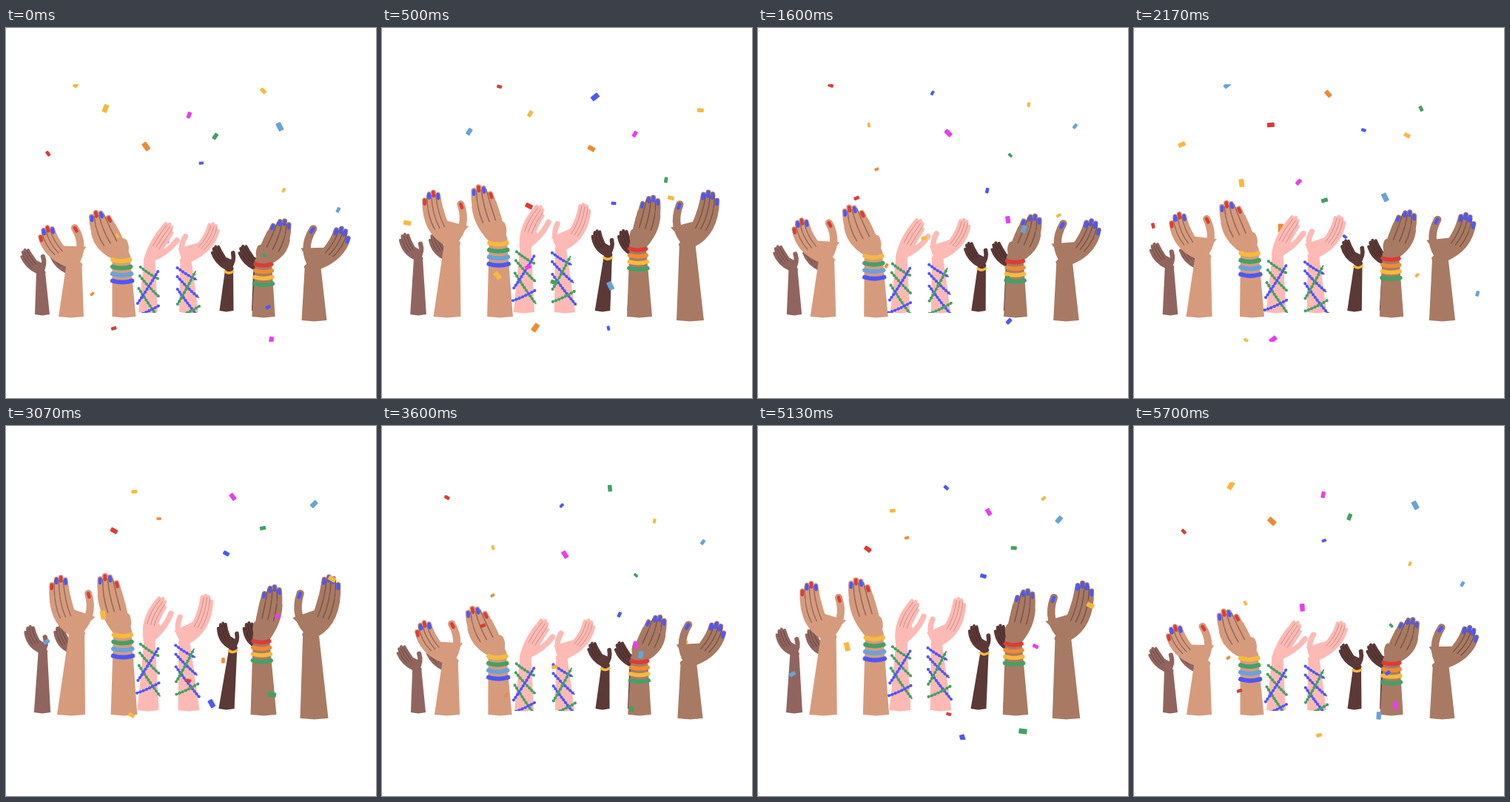
Animation, 500 px wide and 500 px high, one loop 5730 ms. Source, as an HTML page with a canvas:

```html
<!DOCTYPE html>
<html lang="en">
<head>
<meta charset="utf-8">
<title>Raised hands and confetti</title>
<style>
html, body { margin: 0; width: 100%; height: 100%; overflow: hidden; background: #fff; }
canvas { display: block; width: 500px; height: 500px; }
</style>
</head>
<body>
<canvas id="stage" width="500" height="500"></canvas>
<script>
const ctx = document.getElementById('stage').getContext('2d');
const LOOP = 5730, TICK = 100 / 3, STEP = 80, CYCLE = 24;
const TOP = 76, BOTTOM = 424, PIECES = 41, GRAVITY = 2.7;
const RED = '#dc3c36', ORANGE = '#ed8b35', YELLOW = '#f6b93f', GREEN = '#45a065',
      SKY = '#6ba2d8', BLUE = '#4e57f8', PINK = '#ea3df0';

const skins = {
  mauve: { fill: '#91655f', line: '#5f3f3c' },
  peach: { fill: '#d69b7d', line: '#90685a' },
  pink: { fill: '#fdbab4', line: '#c78d83' },
  dark: { fill: '#5b3937', line: '#3f2524' },
  brown: { fill: '#a87a63', line: '#795245' }
};

// Key points are wrist, palm, fingertips and thumb tip, measured from the arm's base.
const shapes = {
  open: {
    low: [[4, -70], [-27, -88], [-34, -116], [5, -120]],
    high: [[8, -114], [-15, -136], [-15, -188], [25, -168]],
    spread: [13.4, 19], wrist: 10.5, tip: 12, pinky: -1, bend: 0.32
  },
  cup: {
    low: [[-4, -81], [-24, -100], [-34, -137], [-1, -100]],
    high: [[-2, -115], [-18, -150], [-21, -188], [3, -135]],
    spread: [25, 22], wrist: 12, tip: 13.5, pinky: 1, bend: 0.33
  },
  reach: {
    low: [[2, -71], [11, -91], [29, -115], [39, -97]],
    high: [[2, -96], [-2, -124], [19, -150], [30, -134]],
    spread: [12, 12], wrist: 7.5, tip: 9, pinky: 1, bend: 0.15
  },
  small: {
    low: [[-2, -57], [-16, -68], [-24, -84], [1, -78]],
    high: [[1, -85], [-14, -96], [-17, -116], [4, -104]],
    spread: [9, 9], wrist: 6, tip: 7.5, pinky: -1, bend: 0.25
  }
};

const defaults = { flip: 1, scale: 1, lean: 0, slim: 1, reach: 1, stub: 1, bands: [], nails: [] };
const rainbow = [RED, ORANGE, YELLOW, GREEN];
const redBlue = [RED, BLUE, RED, BLUE];
const allBlue = Array(4).fill(BLUE);

const arms = [
  { skin: 'mauve', shape: 'small', x: 89, y: 387, base: 9, bands: [RED] },
  { skin: 'mauve', shape: 'small', x: 49, y: 387, base: 10 },
  { skin: 'peach', shape: 'open', x: 88, y: 390, base: 17, nails: redBlue, thumbNail: RED },
  { skin: 'peach', shape: 'cup', x: 159.5, y: 390, base: 16, nails: redBlue, bands: [YELLOW, GREEN, SKY, BLUE] },
  { skin: 'pink', shape: 'reach', x: 192, y: 384, base: 13, beads: [GREEN, BLUE] },
  { skin: 'pink', shape: 'open', x: 247, y: 384, base: 13, flip: -1, slim: 0.72, reach: 0.55, stub: 0.65,
    beads: [BLUE, GREEN] },
  { skin: 'dark', shape: 'small', x: 340, y: 382, base: 8, lean: 0.04 },
  { skin: 'dark', shape: 'small', x: 298, y: 382, base: 9.5, lean: 0.1, slim: 0.9, bands: [YELLOW] },
  { skin: 'brown', shape: 'cup', x: 348, y: 390, base: 17, flip: -1, scale: 0.92, lean: 0.05,
    nails: allBlue, bands: rainbow },
  { skin: 'brown', shape: 'open', x: 416.5, y: 395, base: 16.5, flip: -1, scale: 1.03, lean: -0.03,
    nails: allBlue, thumbNail: BLUE }
].map(arm => ({ ...defaults, ...arm }));

const mix = (a, b, t) => a + (b - a) * t;
const between = (p, q, t) => [mix(p[0], q[0], t), mix(p[1], q[1], t)];
const shift = (p, dir, by) => [p[0] + dir[0] * by, p[1] + dir[1] * by];
const distance = (p, q) => Math.hypot(q[0] - p[0], q[1] - p[1]);

function direction(p, q) {
  const d = distance(p, q) || 1;
  return [(q[0] - p[0]) / d, (q[1] - p[1]) / d];
}

function normal(p, q) {
  const [dx, dy] = direction(p, q);
  return [-dy, dx];
}

// Quadratic curves are [start, control, end]; these cut one at t.
const pointAt = ([a, b, c], t) => between(between(a, b, t), between(b, c, t), t);
const head = (q, t) => [q[0], between(q[0], q[1], t), pointAt(q, t)];
const tail = (q, t) => [pointAt(q, t), between(q[1], q[2], t), q[2]];

function stroke(color, width) {
  ctx.strokeStyle = color;
  ctx.lineWidth = width;
  ctx.lineCap = ctx.lineJoin = 'round';
  ctx.stroke();
}

function drawCurve([a, b, c], color, width) {
  ctx.beginPath();
  ctx.moveTo(...a);
  ctx.quadraticCurveTo(...b, ...c);
  stroke(color, width);
}

function fillBetween(left, right, color) {
  ctx.beginPath();
  ctx.moveTo(...left[0]);
  ctx.quadraticCurveTo(...left[1], ...left[2]);
  ctx.lineTo(...right[2]);
  ctx.quadraticCurveTo(...right[1], ...right[0]);
  ctx.closePath();
  ctx.fillStyle = color;
  ctx.fill();
}

function fillPolygon(points, color) {
  ctx.beginPath();
  points.forEach(p => ctx.lineTo(...p));
  ctx.closePath();
  ctx.fillStyle = color;
  ctx.fill();
}

function drawNail(q, color, width) {
  const back = shift(q[2], direction(q[2], q[1]), 5);
  drawCurve([q[2], between(q[2], back, 0.5), back], color, width);
}

function drawBands(colors, wrist, wristHalf, baseHalf) {
  const thick = wristHalf > 8 ? 6 : 3.5;
  colors.forEach((color, i) => {
    const y = wrist[1] + 5 + 9.5 * i, down = 1 - y / wrist[1];
    const x = wrist[0] * (1 - down), half = mix(wristHalf, baseHalf, down) - 0.5;
    drawCurve([[x - half, y - 1], [x, y + 3], [x + half, y - 1]], color, thick);
  });
}

// Criss-crossing strings: each pair is its drop below the wrist at the left and right edge.
function drawBeads([falling, rising], wrist, flip, lift) {
  const strings = [[falling, 0, 16], [falling, 12, 40], [falling, 29, 70], [rising, 49, 5], [rising, 66, 52]];
  const edge = (side, drop) => {
    const y = wrist[1] + 10 - 6 * lift + drop;
    return [wrist[0] * y / wrist[1] + flip * side * (12 + drop / 20), y];
  };
  ctx.save();
  ctx.beginPath();
  ctx.rect(-40, -200, 80, 201);
  ctx.clip();
  for (const [color, left, right] of strings) {
    const a = edge(-1, left), b = edge(1, right);
    const string = [a, shift(between(a, b, 0.5), [0, 1], 2), b];
    drawCurve(string, color, 2);
    ctx.setLineDash([0, 4.6]);
    drawCurve(string, color, 4.2);
    ctx.setLineDash([]);
  }
  ctx.restore();
}

function drawArm(arm, phase) {
  const { fill, line } = skins[arm.skin], shape = shapes[arm.shape];
  const lift = phase * arm.reach;
  const [wrist, palm, tip, thumbTip] = shape.low.map((p, i) => between(p, shape.high[i], lift));
  const wristHalf = shape.wrist * arm.slim, tipHalf = shape.tip * arm.slim;
  const palmHalf = mix(...shape.spread, lift) * arm.slim, baseHalf = arm.base * (1 + 0.13 * phase);
  const palmSide = normal(wrist, tip), tipSide = normal(palm, tip);
  const ray = o => [shift(wrist, [1, 0], o * wristHalf), shift(palm, palmSide, o * palmHalf),
    shift(tip, tipSide, o * tipHalf)];

  const fingers = [0, 1, 2, 3].map(i => {
    const [a, b, c] = ray(shape.pinky * (0.75 - 0.5 * i));
    const extra = (4 - 2.8 * (i - 1.9) ** 2) * tipHalf / 12;
    return [a, b, shift(c, direction(b, c), extra)];
  });
  const end = between(wrist, thumbTip, arm.stub);
  const joint = shift(between(wrist, end, 0.5), normal(wrist, end), shape.bend * distance(wrist, end));
  const thumb = [wrist, joint, end];
  const fingerWidth = tipHalf * 0.56, inner = ray(1);

  ctx.save();
  ctx.translate(arm.x, arm.y);
  ctx.scale(arm.flip * arm.scale, arm.scale);
  ctx.transform(1, 0, -arm.lean, 1, 0, 0);

  fillPolygon([[-baseHalf, 0], ray(-1)[0], inner[0], [baseHalf, 0], [0, 1.5]], fill);
  fillBetween(head(ray(-1), 0.75), head(inner, 0.75), fill);
  fillPolygon([wrist, inner[1], pointAt(inner, 0.5), joint].filter((p, i) => i !== 1), fill);
  fingers.forEach(f => drawCurve(f, fill, fingerWidth));
  drawCurve(thumb, fill, fingerWidth * 1.5);
  [-0.5, 0, 0.5].forEach(o => drawCurve(tail(ray(o), 0.4), line, tipHalf / 9));
  arm.nails.forEach((color, i) => drawNail(fingers[i], color, 4.6));
  if (arm.thumbNail) drawNail(thumb, arm.thumbNail, 4.6);
  drawBands(arm.bands, wrist, wristHalf, baseHalf);
  if (arm.beads) drawBeads(arm.beads, wrist, arm.flip, phase);
  ctx.restore();
}

function randomFrom(seed) {
  return (low, high) => {
    seed = (seed * 16807) % 2147483647;
    return mix(low, high, seed / 2147483647);
  };
}

const random = randomFrom(4711);
const palette = [YELLOW, BLUE, RED, GREEN, ORANGE, SKY, PINK, YELLOW];
const confetti = Array.from({ length: PIECES }, (_, i) => ({
  color: palette[i % palette.length],
  behind: i % 6 === 0,
  entry: i * CYCLE / PIECES,
  x: 95 + 345 * (i * 0.618 % 1),
  vx: random(-11, 12),
  vy: random(13, 28),
  size: random(6, 12),
  angle: random(0, Math.PI),
  spin: random(-0.25, 0.25)
}));

function drawConfetti(beat, behind) {
  ctx.save();
  ctx.beginPath();
  ctx.rect(0, TOP, 500, BOTTOM - TOP);
  ctx.clip();
  for (const p of confetti.filter(p => p.behind === behind)) {
    const n = (beat - p.entry + CYCLE) % CYCLE;
    const y = TOP + p.vy * n + GRAVITY / 2 * n * n;
    if (y > BOTTOM) continue;
    const w = p.size - 2, h = p.size * 0.62 - 2;
    ctx.save();
    ctx.translate(p.x + p.vx * n, y);
    ctx.rotate(p.angle + p.spin * n);
    ctx.fillStyle = p.color;
    ctx.beginPath();
    ctx.rect(-w / 2, -h / 2, w, h);
    ctx.fill();
    stroke(p.color, 2);
    ctx.restore();
  }
  ctx.restore();
}

const start = performance.now();
function frame() {
  const time = (performance.now() - start) % LOOP;
  const step = Math.floor(Math.floor(time / TICK) * TICK / STEP + 1e-6);
  const beat = step % CYCLE;
  const wave = (1 - Math.cos((beat + 1) * 2 * Math.PI / CYCLE)) / 2;
  ctx.fillStyle = '#fff';
  ctx.fillRect(0, 0, 500, 500);
  drawConfetti(beat, true);
  arms.forEach(arm => drawArm(arm, wave * 1.09 - 0.02));
  drawConfetti(beat, false);
  requestAnimationFrame(frame);
}
frame();
</script>
</body>
</html>
```
